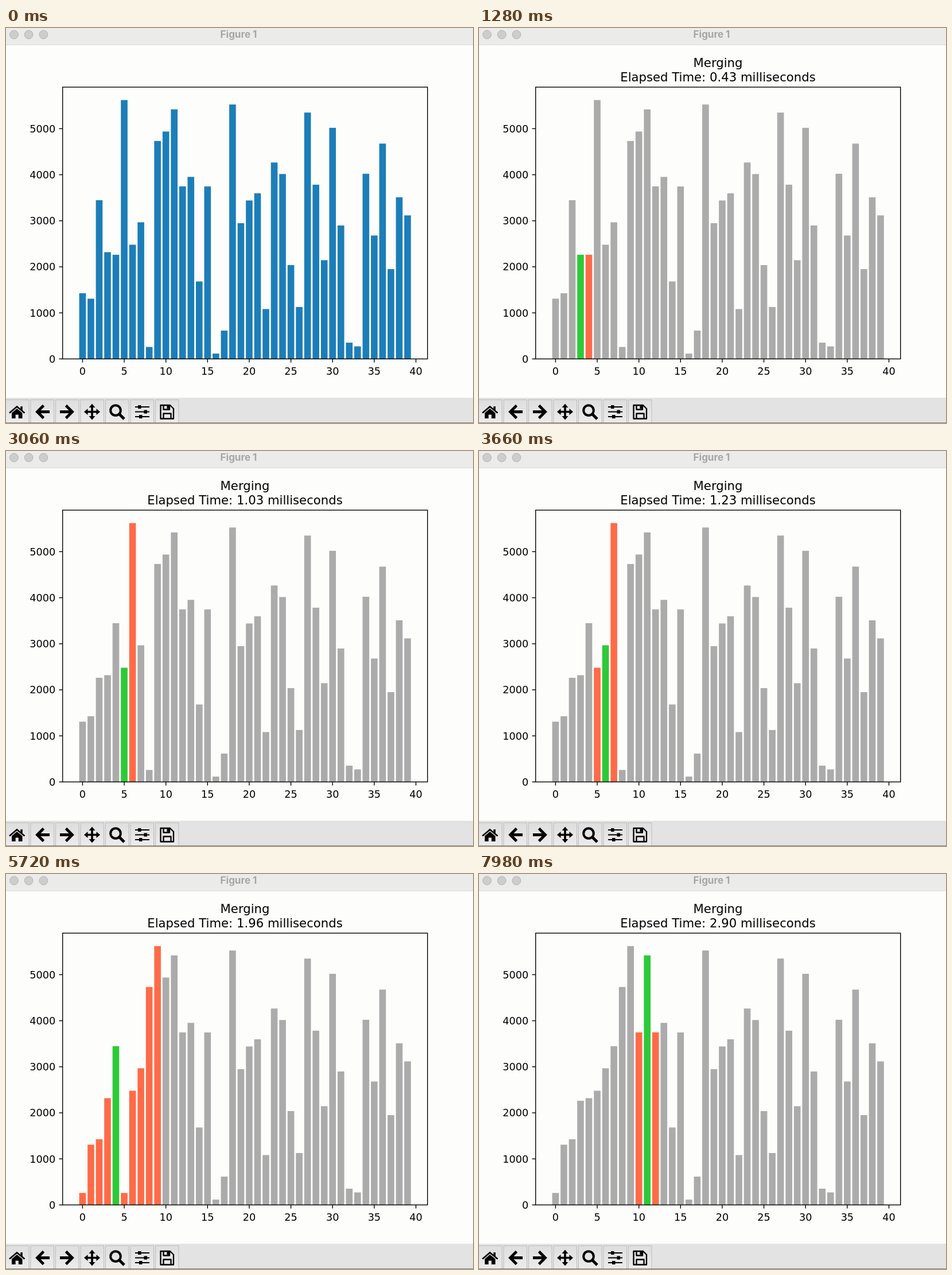
An HTML page for the animation above (8000 ms loop, 814 px wide and 688 px high).

```html
<!DOCTYPE html>
<html lang="en">
<head>
<meta charset="utf-8">
<title>Figure 1</title>
<style>
  html, body { margin: 0; width: 100%; height: 100%; overflow: hidden; background: #fdfdfc; }
  svg { display: block; width: 814px; height: 688px; }
  .plot { font: 17.67px "DejaVu Sans", sans-serif; }
  .title { font-size: 21.2px; text-anchor: middle; }
  .window { font: 700 17px Inter, sans-serif; fill: #a6a6a6; text-anchor: middle; }
  .axis { fill: none; stroke: #000; stroke-width: 1.4; }
  .line { fill: none; stroke: #000; }
</style>
</head>
<body>
<svg viewBox="0 0 814 688">
  <defs>
    <linearGradient id="face" x2="0" y2="1">
      <stop stop-color="#dedede"/><stop offset="1" stop-color="#ececec"/>
    </linearGradient>
  </defs>
  <rect width="814" height="688" fill="#fdfdfc"/>
  <rect width="814" height="29.5" fill="#ebebea"/>
  <path d="M0 29.5H814" stroke="#dddde0"/>
  <g fill="#cdcdcc" stroke="#b4b4b4">
    <circle cx="14" cy="11.5" r="7.4"/><circle cx="39.7" cy="11.5" r="7.4"/><circle cx="65.4" cy="11.5" r="7.4"/>
  </g>
  <text class="window" x="405.5" y="16.8">Figure 1</text>

  <g class="plot">
    <g id="heading" class="title">
      <text x="416.5" y="68">Merging</text>
      <text id="elapsed" x="416.5" y="93"></text>
    </g>
    <g id="bars"></g>
    <g id="xTicks" text-anchor="middle"></g>
    <g id="yTicks" text-anchor="end"></g>
    <rect class="axis" x="98.7" y="103" width="636" height="473.4"/>
  </g>

  <rect y="644" width="814" height="44" fill="#e3e3e3"/>
  <g id="buttons" fill="url(#face)" stroke="#bcbcbc"></g>
  <g id="icons">
    <path d="M10 670.5L19 663L28.5 670.5V680H21.8V673.5H16.6V680H10ZM25.3 659H28.8V667L25.3 664Z"/>
    <path class="line" stroke-width="2.6" d="M6 670.5L19 659.5L32.5 670.5"/>
    <path class="line" stroke-width="4.8" d="M76 668.5H55M65.5 657.5L54.5 668.5L65.5 679.5"/>
    <path class="line" stroke-width="4.8" d="M94 668.5H115M104.5 657.5L115.5 668.5L104.5 679.5"/>
    <path class="line" stroke-width="3.6" d="M139 668.5H161M150 658V679"/>
    <path d="M150 654.5L155.5 661H144.5ZM150 682.5L155.5 676H144.5ZM136 668.5L142.5 663V674ZM164 668.5L157.5 663V674Z"/>
    <circle class="line" stroke-width="4" cx="191" cy="666" r="8.8"/>
    <path class="line" stroke-width="5" d="M197.5 672.5L206 681"/>
    <path class="line" stroke-width="2.2" d="M225 660H250M225 668.5H250M225 677H250"/>
    <path d="M230 657H235.5V663H230ZM240.5 665.5H246V671.5H240.5ZM232 674H237.5V680H232Z"/>
    <path class="line" stroke-width="2.3" stroke-linejoin="round" d="M269.5 657H286L292 663V680.5H269.5ZM274.5 657V664.5H285V657M274.5 680.5V671.5H287.5V680.5"/>
    <path d="M280.5 657H284V663H280.5Z"/>
  </g>
  <path d="M0 687.6H814" stroke="#77777a"/>
</svg>
<script>
const VALUES = [1426, 1308, 3447, 2318, 2262, 5621, 2480, 2967, 260, 4733,
  4938, 5419, 3747, 3953, 1682, 3745, 116, 615, 5525, 2948,
  3441, 3597, 1083, 4265, 4015, 2038, 1127, 5350, 3784, 2144,
  5019, 2898, 353, 272, 4021, 2680, 4676, 1950, 3510, 3117];
const CLOCK = [[0, 0], [3, .24], [9, .63], [14, 1.03], [22, 1.56], [27, 1.96], [37, 2.9]];
const LOOP = 8000, LEFT = 98.7, BASE = 576.4, HEIGHT = 473.4, PITCH = 14.527;
const COLORS = { idle: '#ababab', start: '#1c7eb8', range: '#ff6b48', mid: '#2dca38' };

const $ = id => document.getElementById(id);
const barX = i => LEFT + (i + 2.39) * PITCH;

function add(parent, tag, attrs, text = '') {
  const node = document.createElementNS('http://www.w3.org/2000/svg', tag);
  for (const key in attrs) node.setAttribute(key, attrs[key]);
  node.textContent = text;
  return parent.appendChild(node);
}

// One snapshot for every value written back by the merge sort.
function* mergeSort(a, lo, hi) {
  if (lo >= hi) return;
  const mid = (lo + hi) >> 1;
  yield* mergeSort(a, lo, mid);
  yield* mergeSort(a, mid + 1, hi);
  const sorted = a.slice(lo, hi + 1).sort((p, q) => p - q);
  for (let k = lo; k <= hi; k++) {
    a[k] = sorted[k - lo];
    yield { values: [...a], lo, mid, hi };
  }
}
const states = [{ values: VALUES }, ...mergeSort([...VALUES], 0, VALUES.length - 1)];

function elapsedAt(step) {
  const i = Math.max(1, CLOCK.findIndex(([s]) => s >= step));
  const [s0, v0] = CLOCK[i - 1], [s1, v1] = CLOCK[i];
  return v0 + (v1 - v0) * (step - s0) / (s1 - s0);
}

// Pictures are held for 100, 20 and 20 ms in turn, after a first one of 20 ms.
function pictureAt(t) {
  if (t < 20) return 0;
  const rest = (t - 20) % 140;
  return 1 + 3 * Math.floor((t - 20) / 140) + (rest >= 100) + (rest >= 120);
}
const stepAt = t => Math.floor((pictureAt(t) + 3) / 4.6);

const bars = VALUES.map((_, i) =>
  add($('bars'), 'rect', { x: barX(i - .4), width: PITCH * .8 }));
for (let n = 0; n <= 40; n += 5) {
  add($('xTicks'), 'path', { class: 'axis', d: `M${barX(n)} ${BASE}v6.2` });
  add($('xTicks'), 'text', { x: barX(n), y: 603.6 }, n);
}
const yTicks = [0, 1, 2, 3, 4, 5].map(n => {
  const tick = add($('yTicks'), 'g', {});
  add(tick, 'path', { class: 'axis', d: `M${LEFT} 0h-6.2` });
  add(tick, 'text', { x: 86.3, y: 6.5 }, n * 1000);
  return tick;
});
for (let i = 0; i < 7; i++)
  add($('buttons'), 'rect', { x: -.5 + i * 43.5, y: 647.5, width: 40.5, height: 41 });

let shown = -1;
function draw(step) {
  if (step === shown) return;
  shown = step;
  const { values, lo, mid, hi } = states[step];
  const scale = HEIGHT / (Math.max(...values) * 1.05);
  bars.forEach((bar, i) => {
    const h = values[i] * scale;
    bar.setAttribute('y', BASE - h);
    bar.setAttribute('height', h);
    bar.setAttribute('fill', step === 0 ? COLORS.start : i === mid ? COLORS.mid
      : i >= lo && i <= hi ? COLORS.range : COLORS.idle);
  });
  yTicks.forEach((tick, n) =>
    tick.setAttribute('transform', `translate(0 ${BASE - n * 1000 * scale})`));
  $('heading').setAttribute('visibility', step ? 'visible' : 'hidden');
  $('elapsed').textContent = `Elapsed Time: ${elapsedAt(step).toFixed(2)} milliseconds`;
}

const began = performance.now();
function tick() {
  draw(stepAt((performance.now() - began) % LOOP));
  requestAnimationFrame(tick);
}
tick();
</script>
</body>
</html>
```
